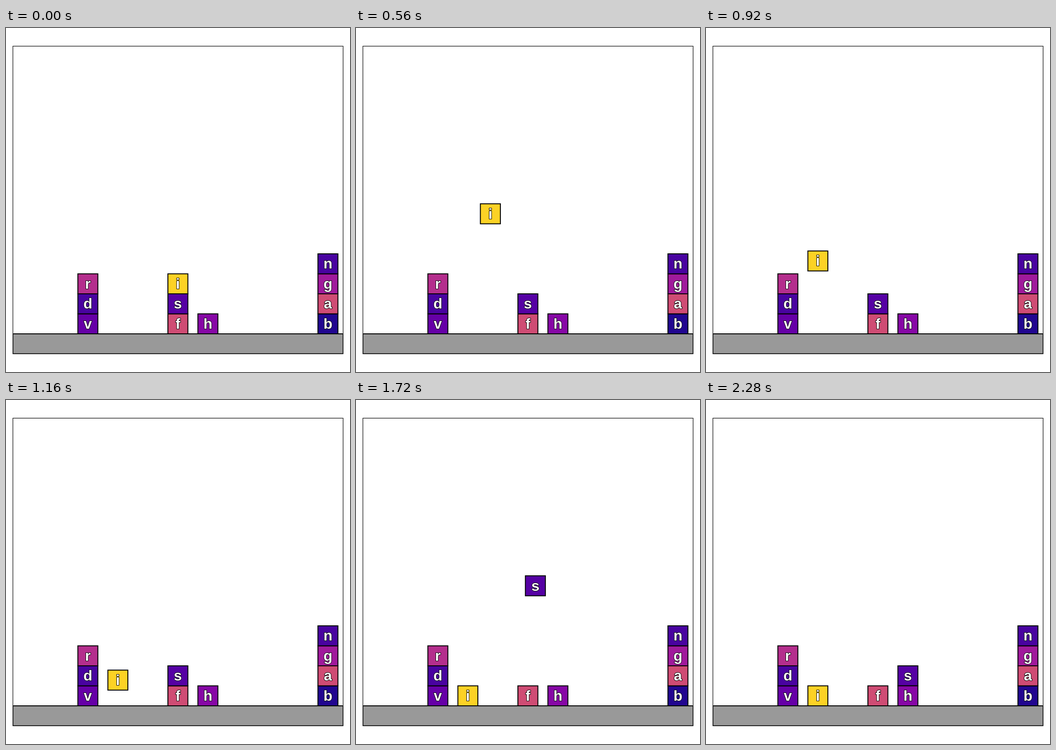
These frames come from a looping animation (748 by 748 pixels, 2.32 s). An HTML page:

```html
<!DOCTYPE html>
<html lang="en">
<head>
<meta charset="utf-8">
<title>Stacking blocks</title>
<style>
html, body { margin: 0; width: 100%; height: 100%; overflow: hidden; background: #fff; }
svg { display: block; width: 100%; height: 100%; }
.edge { stroke: #000; stroke-width: 2; }
text {
  font: bold 32px "Liberation Sans", Arial, sans-serif;
  text-anchor: middle;
  fill: #fff;
  stroke: #000;
  stroke-width: 2;
  stroke-linejoin: round;
  paint-order: stroke;
}
</style>
</head>
<body>
<svg id="stage" viewBox="0 0 748 748">
  <clipPath id="inside"><rect x="15" y="39.5" width="718" height="669"/></clipPath>
  <rect class="edge" x="15" y="665" width="718" height="43.5" fill="#999" clip-path="url(#inside)"/>
  <g id="blocks"></g>
  <rect x="15" y="39.5" width="718" height="669" fill="none" stroke="#000" stroke-width="1.2"/>
</svg>
<script>
const UNIT = 43.5, FLOOR = 665, PITCH = 1.5 * UNIT, LEFT = 178;
const STEP = 40, STEPS = 58, LIFT = 5.5;
const NS = "http://www.w3.org/2000/svg";
const layer = document.getElementById("blocks");

// letter, colour, column, level
const blocks = [
  ["v", "#6600a7", 0, 0], ["d", "#4903a0", 0, 1], ["r", "#b42e8d", 0, 2],
  ["f", "#cf4c74", 3, 0], ["s", "#5601a4", 3, 1], ["i", "#fcd225", 3, 2],
  ["h", "#8707a6", 4, 0],
  ["b", "#220690", 8, 0], ["a", "#cf4c74", 8, 1], ["g", "#a01a9c", 8, 2], ["n", "#4903a0", 8, 3]
];

function add(parent, name, attrs) {
  const el = document.createElementNS(NS, name);
  for (const key in attrs) el.setAttribute(key, attrs[key]);
  return parent.appendChild(el);
}

function place(el, col, level) {
  const x = LEFT + col * PITCH, y = FLOOR - (level + 0.5) * UNIT;
  el.setAttribute("transform", `translate(${x} ${y})`);
}

const parts = {};
for (const [letter, fill, col, level] of blocks) {
  const g = parts[letter] = add(layer, "g", {});
  add(g, "rect", { class: "edge", x: -UNIT / 2, y: -UNIT / 2, width: UNIT, height: UNIT, fill });
  add(g, "text", { x: 0, y: 10.5 }).textContent = letter;
  place(g, col, level);
}

// each move lifts, carries and lowers; spans are in steps
const moves = [
  { letter: "i", start: 0, from: [3, 2], to: [1, 0], spans: [9, 8, 14] },
  { letter: "s", start: 31, from: [3, 1], to: [4, 1], spans: [11, 4, 11] }
];

const clamp = v => Math.max(0, Math.min(1, v));
const mix = (a, b, p) => a + (b - a) * p;

function draw(ms) {
  const step = Math.floor(ms / STEP) % STEPS;
  for (const { letter, start, from, to, spans: [up, across, down] } of moves) {
    const n = step - start;
    const lift = clamp(n / up);
    const carry = clamp((n - up) / across);
    const drop = clamp((n - up - across) / down);
    const level = drop > 0 ? mix(LIFT, to[1], drop) : mix(from[1], LIFT, lift);
    place(parts[letter], mix(from[0], to[0], carry), level);
  }
}

const begin = performance.now();
function tick() {
  draw(performance.now() - begin);
  requestAnimationFrame(tick);
}
draw(0);
requestAnimationFrame(tick);
</script>
</body>
</html>
```
